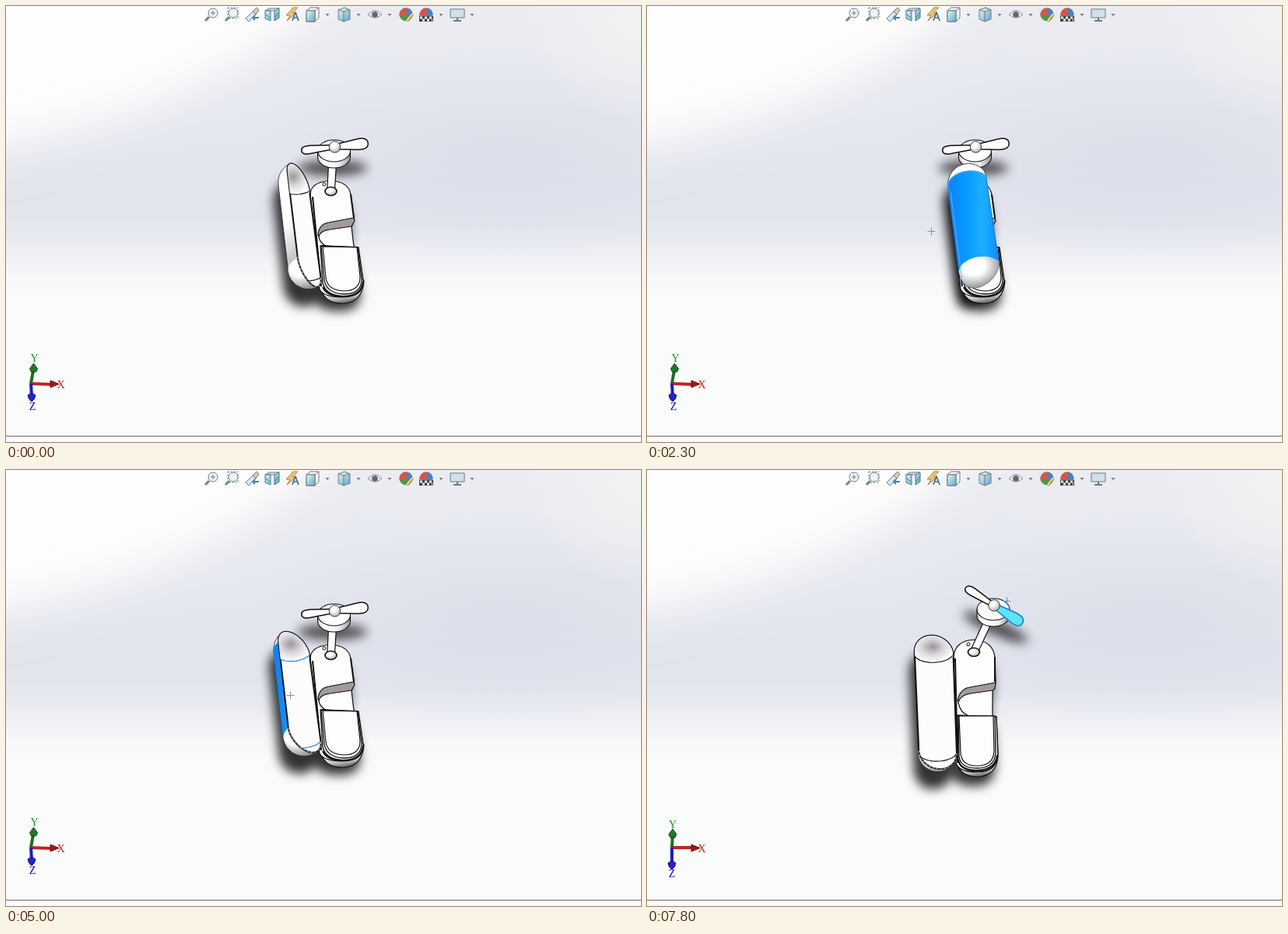
Write an HTML page that moves like this. It is 816 by 560 pixels and loops after 8000 ms.

```html
<!DOCTYPE html>
<html lang="zh">
<head>
<meta charset="utf-8">
<style>
html, body { margin: 0; width: 816px; height: 560px; overflow: hidden; background: #fafcfb; }
svg { display: block; }
text { font-family: "Noto Sans CJK SC", "Noto Sans CJK", "Noto Sans", sans-serif; font-size: 13px; }
#triad text { font: 14px "Liberation Serif", serif; text-anchor: middle; }
</style>
</head>
<body>
<svg id="stage" width="816" height="560" viewBox="0 0 816 560" fill="none" stroke-linejoin="round">
  <defs>
    <linearGradient id="sky" gradientUnits="userSpaceOnUse" x1="0" y1="0" x2="0" y2="370">
      <stop stop-color="#eaecf2"/><stop offset=".4" stop-color="#e6e8f0"/><stop offset=".76" stop-color="#dfe2ec"/>
      <stop offset=".83" stop-color="#e9ebf2"/><stop offset=".92" stop-color="#f8f9fb"/><stop offset="1" stop-color="#fafcfb"/>
    </linearGradient>
    <radialGradient id="haze"><stop stop-color="#d9dce7"/><stop offset="1" stop-color="#d9dce8" stop-opacity="0"/></radialGradient>
    <radialGradient id="corner"><stop stop-color="#f2f2f2"/><stop offset="1" stop-color="#f2f2f2" stop-opacity="0"/></radialGradient>
    <linearGradient id="blue"><stop stop-color="#0a82fb"/><stop offset=".4" stop-color="#0a9cff"/><stop offset=".68" stop-color="#1cb0ff"/><stop offset="1" stop-color="#0a8cfb"/></linearGradient>
    <linearGradient id="side"><stop stop-color="#d8d8d8"/><stop offset=".25" stop-color="#fff"/><stop offset=".65" stop-color="#eee"/><stop offset="1" stop-color="#999"/></linearGradient>
    <linearGradient id="belly" x2=".3" y2="1"><stop offset=".5" stop-color="#fff"/><stop offset=".85" stop-color="#bbb"/><stop offset="1" stop-color="#777"/></linearGradient>
    <radialGradient id="cap" cx=".35" cy=".3" r=".75"><stop offset=".4" stop-color="#fff"/><stop offset=".75" stop-color="#bdbdbd"/><stop offset="1" stop-color="#8c8c8c"/></radialGradient>
    <radialGradient id="bowl" cx=".48" cy=".42" r=".55"><stop stop-color="#99969a"/><stop offset=".5" stop-color="#d8d3d8"/><stop offset="1" stop-color="#fdfcfd"/></radialGradient>
    <radialGradient id="ball" cx=".4" cy=".35" r=".65"><stop offset=".3" stop-color="#fff"/><stop offset="1" stop-color="#b5b5b5"/></radialGradient>
    <linearGradient id="glass" x2="1" y2="1"><stop stop-color="#e3f5fb"/><stop offset="1" stop-color="#5da9c7"/></linearGradient>
    <filter id="soft" x="-50%" y="-50%" width="200%" height="200%"><feGaussianBlur stdDeviation="7"/></filter>
    <filter id="mist" x="-20%" y="-20%" width="140%" height="140%"><feGaussianBlur stdDeviation="28"/></filter>
    <clipPath id="mouth"><path id="mouthPath"/></clipPath>
  </defs>

  <path fill="#fdfdfd" d="M0 0H816V300H0Z"/>
  <path fill="url(#sky)" filter="url(#mist)" d="M-90 195Q300 145 470 -70H906V390H-90Z"/>
  <ellipse cx="640" cy="190" rx="330" ry="135" fill="url(#haze)" opacity=".75"/>
  <ellipse cx="816" cy="20" rx="150" ry="130" fill="url(#corner)"/>
  <path stroke="#75697c" d="M0 552.5H816"/>

  <g id="toolbar" transform="translate(0 11)" stroke="#6f7a80"></g>

  <g id="shadows" fill="#000" filter="url(#soft)">
    <path id="lidShadow" opacity=".8"/><path id="baseShadow" opacity=".8"/>
    <ellipse id="fanShadow" rx="45" ry="10" opacity=".66"/>
  </g>
  <g id="base" stroke="#111" stroke-width="1.2"></g>
  <g id="fan" stroke="#111" stroke-width="1.1">
    <path id="armEdge" stroke-width="11"/><path id="arm" stroke="#fff" stroke-width="8.6"/>
    <ellipse id="joint" rx="7.500" ry="5.500" fill="url(#ball)" stroke-width="1.6"/>
    <g id="head">
      <path fill="url(#side)" d="M-22 5V13A21 14 0 0 0 20 13V5Z"/>
      <ellipse cx="-1" cy="5" rx="21" ry="14" fill="#fff"/>
      <g id="blades">
        <path fill="#fff" stroke-width="1.5" d="M0-2.5L-32-5.5Q-43-6-43 0Q-43 6-32 5L0 2.5Z"/>
        <path id="blade" stroke-width="1.5" d="M0-3L30-7Q43-8 43 0Q43 8 30 7L0 3Z"/>
      </g>
      <circle r="7.300" fill="url(#ball)" stroke-width=".8"/>
    </g>
  </g>
  <g id="lid">
    <path id="shell" fill="url(#belly)" stroke="#333" stroke-width=".9"/>
    <path id="barrel"/>
    <path id="endCap" fill="url(#cap)"/>
    <path id="hidden" stroke="#62b4f5" stroke-width=".9"/>
    <g id="inside">
      <path id="opening" fill="#fdfcfd" stroke="#111" stroke-width="2"/>
      <g clip-path="url(#mouth)">
        <path id="bowlShape" fill="url(#bowl)"/><path id="seams" stroke-width="1.2"/>
      </g>
      <path id="lip" stroke="#fff" stroke-width=".7" stroke-dasharray="3 2"/>
    </g>
  </g>
  <path id="cross" d="M-4.500 .5H5.500M.5-4.500V5.500"/>

  <g id="triad">
    <path id="axisX" stroke="#c22323" stroke-width="4"/><path id="axisY" stroke="#1c6b20" stroke-width="4"/><path id="axisZ" stroke="#1c1cc8" stroke-width="4"/>
    <path fill="#a81616" stroke="#611" d="M57 481L68 485.500L57 490Z"/>
    <path id="coneY" fill="#1f7a25" stroke="#143f16" d="M0-6L5 1L3 5H-3L-5 1Z"/>
    <path id="coneZ" fill="#2222d8" stroke="#15157a" d="M-5-2Q0-7 5-2Q4 4 0 6Q-4 4-5-2Z"/>
    <text id="labelX" fill="#d01818">X</text><text id="labelY" fill="#159a1b">Y</text><text id="labelZ" fill="#0808e0">Z</text>
  </g>

  <g id="panel">
    <g fill="#fbfbfb" stroke="#cfcfcf">
      <path d="M66.500 13.500H95.500V42.500H66.500ZM97.500 13.500H126.500V42.500H97.500ZM158.500 83.500H231.500V112.500H158.500Z"/>
      <path fill="#f7f8f8" d="M.5 48.500H228.500V77.500H-1"/>
      <path fill="#c6dcee" stroke="#8fb6d8" d="M178.500 48.500H228.500V77.500H178.500L192.500 63Z"/>
      <path fill="none" d="M30 48L44 63L30 78M65 48L79 63L65 78M100 48L114 63L100 78"/>
    </g>
    <path stroke="#888" fill="#fff" d="M50.500 33V25.500H55V22L61 27.500L55 33V29.500H53V33ZM141.500 91V99.500H147V103L153 97.500L147 92V95.500H144.500V91Z"/>
    <path stroke="#777" fill="#c9cdd0" d="M73 19H77V36L73 33ZM79 19H83V33L79 36ZM85 19H89V30L85 35Z"/>
    <g stroke="#5a94b8" stroke-width="1.600"><circle cx="112" cy="28" r="8"/><circle cx="112" cy="28" r="3.500"/></g>
    <g stroke="#8c7530" fill="#f0cf62">
      <path d="M12 60L20 55L29 60V69L21 72L12 67ZM47 60L53 55L58 58V62L64 64V69L57 72L47 67Z"/>
      <path fill="#75b4d4" stroke="#487b95" d="M20 62L29 58V69L20 72ZM82 58L90 54L98 58V69L90 73L82 69ZM82 58L90 62L98 58M90 62V73M197.500 56.500H211.500V70.500H197.500Z"/>
    </g>
    <path stroke="#4d8fb3" stroke-width="5" d="M121 57Q132 52 131 62Q127 67 119 65M120 68Q126 74 133 68"/>
    <path stroke="#666" d="M182 90H168Q164 90 164.500 94V102Q165 107 170 107H182"/>
    <g fill="#111"><text id="feature" x="141" y="70">旋转2</text><text id="sketch" x="189" y="104">草图6</text></g>
  </g>
</svg>
<script>
const $ = id => document.getElementById(id);
const set = (id, attrs) => { for (const k in attrs) $(id).setAttribute(k, attrs[k]); };
const show = (id, on) => set(id, { display: on ? 'inline' : 'none' });
const lerp = (a, b, v) => a + (b - a) * v;
const mix = (p, q, v) => p.map((a, i) => lerp(a, q[i], v));
const move = ([x, y]) => `translate(${x} ${y})`;
const NUM = /-?\d+(\.\d+)?/g;
const morph = (a, b, v) => { const to = b.match(NUM); let i = 0; return a.replace(NUM, n => lerp(+n, +to[i++], v).toFixed(2)); };
const ramp = (t, a, b) => Math.min(1, Math.max(0, (t - a) / (b - a)));
const keyed = (t, keys) => {
  const i = keys.findIndex(k => k[0] > t);
  if (i < 0) return keys[keys.length - 1][1];
  const [a, b] = [keys[i - 1], keys[i]];
  return lerp(a[1], b[1], ramp(t, a[0], b[0]));
};
const line = pts => 'M' + pts.map(p => p[0].toFixed(2) + ' ' + p[1].toFixed(2)).join('L');
const sweep = (from, to, n, fn) => Array.from({ length: n + 1 }, (_, i) => fn(lerp(from, to, i / n)));
const PI = Math.PI;

function hull(points) {
  const half = pts => {
    const out = [];
    for (const p of pts) {
      while (out.length > 1) {
        const [a, b] = out.slice(-2);
        if ((b[0] - a[0]) * (p[1] - a[1]) - (b[1] - a[1]) * (p[0] - a[0]) > 0) break;
        out.pop();
      }
      out.push(p);
    }
    return out.slice(0, -1);
  };
  const sorted = [...points].sort((a, b) => a[0] - b[0] || a[1] - b[1]);
  return [...half(sorted), ...half(sorted.reverse())];
}

// Each part of the open case: shape before and after the view turns, fill, line width.
const OUTLINE = [
  'M403 364L391 243Q391 226 416 224.500Q440 225 443 242L447 272L444 284L447 309L452 310L459 352Q460 373 434 374Q408 374 403 364Z',
  'M397 376L394 240Q396 219 420 218Q444 219 447 240L448 272L444 283L444 316L449 317L451 366Q449 388 425 388Q400 388 397 376Z'];
const PARTS = [
  ['M404 358Q406 382 433 382Q458 381 460 353Z', 'M398 372Q400 394 425 394Q449 393 451 368Z', 'url(#belly)'],
  [...OUTLINE, '#fdfdfd'],
  ['M394 245L405 360', 'M396 242L399 376', 'none', 2],
  ['M443 242L447 272', 'M447 240L447 272', 'none', 2],
  ['M414 287Q402 290 402 297Q404 305 411 308', 'M414 287Q400 290 400 299Q403 312 412 315', '#fff'],
  ['M401 294Q402 280 415 278L447 272L448 276L444 283L417 287Q404 288 402 296Z', 'M399 296Q402 281 415 279L448 273L447 281L444 283L416 287Q403 289 400 298Z', '#a39a9c'],
  ['M404 308L453 310L459 353Q458 373 434 373Q411 372 407 356Z', 'M399 315L449 317L451 366Q449 387 424 387Q402 386 400 372Z', '#eee', 1.3],
  ['M405 308L452 310L457 351Q457 370 434 370Q412 369 409 352Z', 'M400 316L447 316L448 364Q446 383 424 383Q403 383 401 368Z', '#fff', 1.3],
  ['M407 309L451 310L455 348Q455 366 434 366Q413 365 411 349Z', 'M401 316L445 316L446 361Q445 380 424 380Q404 380 403 363Z', '#fdfdfd'],
  ['M407 361Q412 373 434 373Q457 372 459 354', 'M400 372Q402 386 424 386Q448 385 450 366', 'none', 2],
  ['M407 228Q409 225 411 228Q411 231 409 231Q406 231 407 228Z', 'M411 223Q413 220 415 223Q415 226 413 226Q410 226 411 223Z', '#fff', 1]
];
$('base').innerHTML = PARTS.map(p => `<path fill="${p[2]}" stroke-width="${p[3] || 1.2}"/>`).join('');

function drawToolbar() {
  const at = (x, body) => `<g transform="translate(${x} 0)">${body}</g>`;
  const lens = '<path stroke="#64889c" stroke-width="3" d="M-3 3L-8 8"/><circle cx="2" cy="-2" r="6" fill="#eaf3f7"/>';
  const cube = '<path fill="#f4f8fa" d="M-8-5L-3-9H8V4L3 9H-8ZM-8-5H3L8-9M3-5V9"/>';
  const globe = '<circle r="8.500" fill="#4d9a52" stroke="none"/><path fill="#d9534a" stroke="none" d="M0 0L-8 3A8.500 8.500 0 0 1 2-8.200Z"/><path fill="#4b7fc8" stroke="none" d="M0 0L2-8.200A8.500 8.500 0 0 1 8 3Z"/>';
  const icons = {
    264: lens + '<path d="M2-5V1M-1-2H5"/>',
    290: '<path stroke-dasharray="2 2" d="M-5-9H8V5H-5Z"/>' + lens,
    316: '<path fill="#dfe6ea" d="M-8 5L1-4L5 0L-4 9Z"/><path fill="#ccc" d="M1-4L6-9L9-6L5 0Z"/><path stroke="#3d86aa" stroke-width="2" d="M9 4H1M4 1L1 4L4 7"/>',
    342: '<path fill="#d5e2e8" d="M-9-5L-4-8H9L4-5Z"/><path fill="url(#glass)" stroke="#47748a" d="M-9-5H-2V8L-9 5ZM3-5L9-8V4L3 8Z"/><path stroke="#47748a" d="M-8 0L-3 4M4 3L8-2"/>',
    368: '<path fill="#f3c26c" stroke="#b58139" d="M1-9L-8 1H-3L-7 8L5-2H0L7-9Z"/><path stroke="#356fa0" stroke-width="1.600" d="M0 8L4-3L8 8M2 4H7"/>',
    394: cube + '<path fill="url(#glass)" d="M-8-5H3V9H-8Z"/>',
    434: '<path fill="url(#glass)" d="M-7-6L1-9L8-6V6L0 9L-7 6ZM-7-6L0-4L8-6M0-4V9"/>',
    474: '<path fill="#eee" stroke="#8a8a8a" d="M-9 0Q0-10 9 0Q0 8-9 0Z"/><circle r="3.500" fill="#62696d"/>',
    514: globe + '<path stroke="#8d6b2a" stroke-width="4" d="M8-1L1 8"/><path stroke="#f2d58a" stroke-width="2.400" d="M8-1L1 8"/>',
    540: globe + '<path fill="#444" stroke="none" d="M-9 2H9V9H-9Z"/><path stroke="#eee" stroke-dasharray="3 3" stroke-width="3" d="M-8 4H8M-5 7H8"/>',
    580: '<path fill="#cfe0e8" d="M-9-7H9V4H-9Z"/><path stroke-width="2" d="M0 4V8M-5 8H5"/>'
  };
  const carets = [413, 453, 493, 559, 599].map(x => at(x, '<path fill="#777" stroke="none" d="M-2.500-1H2.500L0 2Z"/>'));
  $('toolbar').innerHTML = Object.entries(icons).map(([x, body]) => at(x, body)).join('') + carets.join('');
}

function drawLid(t, view) {
  const angle = keyed(t, [[0, 57], [1500, 57], [1900, 100], [2300, 151], [2400, 151], [2600, 162], [2800, 162], [3100, 171],
    [3200, 171], [3500, 179], [3700, 179], [3900, 150], [4100, 111], [4600, 66], [5000, 40], [5200, 30], [5400, 30], [5500, 26],
    [6000, 26], [6400, 16], [6600, 13]]) * PI / 180;
  const c = Math.cos(angle), s = Math.sin(angle);
  const top = mix([390, 238], [393.5, 237], view), bottom = mix([404.5, 349], [398, 364], view);
  const tilt = lerp(.09, .03, view), lift = lerp(.62, .48, view), depth = lerp(.77, .88, view);
  // q: across the rim, w: into the bulge, k: along the axis, all in radii
  const point = (q, w, k, end) => {
    const r = lerp(lerp(26, 25.5, view), lerp(27.2, 25, view), end);
    const x = -c * (1 + q) - s * w, y = s * (1 + q) - c * w;
    const [hx, hy] = mix(top, bottom, end);
    return [hx + r * (x + k * tilt), hy + r * (k * depth - x * tilt - y * lift)];
  };
  const seam = end => sweep(0, PI, 24, f => point(Math.cos(f), Math.sin(f), 0, end));
  const arc = (from, end) => sweep(from, from + PI, 24, b => point(Math.cos(b), 0, -Math.sin(b), end));
  const dome = end => sweep(0, PI / 2, 8, a => sweep(0, PI, 20, f =>
    point(Math.cos(a) * Math.cos(f), Math.cos(a) * Math.sin(f), (end * 2 - 1) * Math.sin(a), end))).flat();
  const seamTop = seam(0), seamEnd = seam(1), domeEnd = dome(1);
  const rim = line([...arc(0, 0), ...arc(PI, 1)]) + 'Z';
  const body = line(hull([...dome(0), ...domeEnd])) + 'Z';
  const picked = t >= 1000 && t < 7200, hover = t >= 300 && t < 700 || t >= 900 && t < 1000;
  const edge = picked || hover ? '#1683f2' : '#111';
  const open = c > 0.02;
  set('shell', { d: body });
  set('lidShadow', { d: body, transform: 'translate(-6 23)' });
  set('barrel', { d: line(hull([...seamTop, ...seamEnd])) + 'Z', fill: picked ? 'url(#blue)' : 'none', stroke: picked || hover ? edge : 'none' });
  set('endCap', { d: line(hull(domeEnd)) + 'Z' });
  show('hidden', picked && !open);
  set('hidden', { d: line([...seamTop, bottom]) });
  show('inside', open);
  set('opening', { d: rim });
  set('mouthPath', { d: rim });
  set('lip', { d: line([...arc(PI, 1), top]) });
  set('bowlShape', { d: line([...arc(0, 0), ...[...seamTop].reverse()]) + 'Z' });
  set('seams', { d: line(seamTop) + line(seamEnd), stroke: edge });
}

function drawFan(t, view) {
  const swing = ramp(t, 7400, 7800);
  const hub = mix(mix([422.5, 181], [430.5, 170], view), [446, 174], swing);
  const pivot = mix([417.5, 238], [420, 234], view);
  const end = mix([hub[0] - 3, hub[1] + 21], [hub[0] - 8, hub[1] + 21], swing);
  const rod = line([pivot, end]);
  set('arm', { d: rod });
  set('armEdge', { d: rod });
  set('joint', { cx: pivot[0], cy: pivot[1] });
  set('head', { transform: move(hub) });
  set('blades', { transform: `rotate(${lerp(lerp(-6.5, -9, view), 32, swing)})` });
  set('blade', { fill: t >= 7200 ? '#59e5fc' : '#fff', stroke: t >= 6900 ? '#187cd8' : '#111' });
  set('fanShadow', { cx: hub[0] - 3 + swing * 5, cy: hub[1] + 27, transform: `rotate(${swing * 24} ${hub[0]} ${hub[1] + 27})` });
}

function drawTriad(view) {
  const o = [32, 485], x = mix([59, 486], [59, 485], view), y = mix([35.5, 465], [33, 467], view), z = mix([33, 502], [32, 507], view);
  set('axisX', { d: line([o, x]) });
  set('axisY', { d: line([o, y]) });
  set('axisZ', { d: line([o, z]) });
  set('coneY', { transform: move(y) });
  set('coneZ', { transform: move(z) });
  set('labelX', { transform: move([70.5, 491]) });
  set('labelY', { transform: move(mix([36.5, 457], [33, 460], view)) });
  set('labelZ', { transform: move(mix([34, 519], [32, 523], view)) });
}

function draw(ms) {
  const t = Math.floor(ms % 8000 / 100) * 100;
  const view = ramp(t, 6000, 6400);
  const onBlade = t >= 7200;
  PARTS.forEach(([a, b], i) => $('base').children[i].setAttribute('d', morph(a, b, view)));
  set('baseShadow', { d: morph(...OUTLINE, view), transform: 'translate(-4 18)' });
  drawFan(t, view);
  drawLid(t, view);
  drawTriad(view);
  show('cross', t >= 1000);
  set('cross', { transform: move(onBlade ? [462, 168] : mix([365, 289], [357, 301], view)), stroke: onBlade ? '#3b9dff' : t < 1500 ? '#5ab4ff' : '#8d9199' });
  show('panel', t >= 1400 && t < 1500 || onBlade && t < 7500);
  $('feature').textContent = onBlade ? '拉伸5' : '旋转2';
  $('sketch').textContent = onBlade ? '草图9' : '草图6';
}

drawToolbar();
const start = performance.now();
function tick() {
  draw(performance.now() - start);
  requestAnimationFrame(tick);
}
tick();
</script>
</body>
</html>
```
